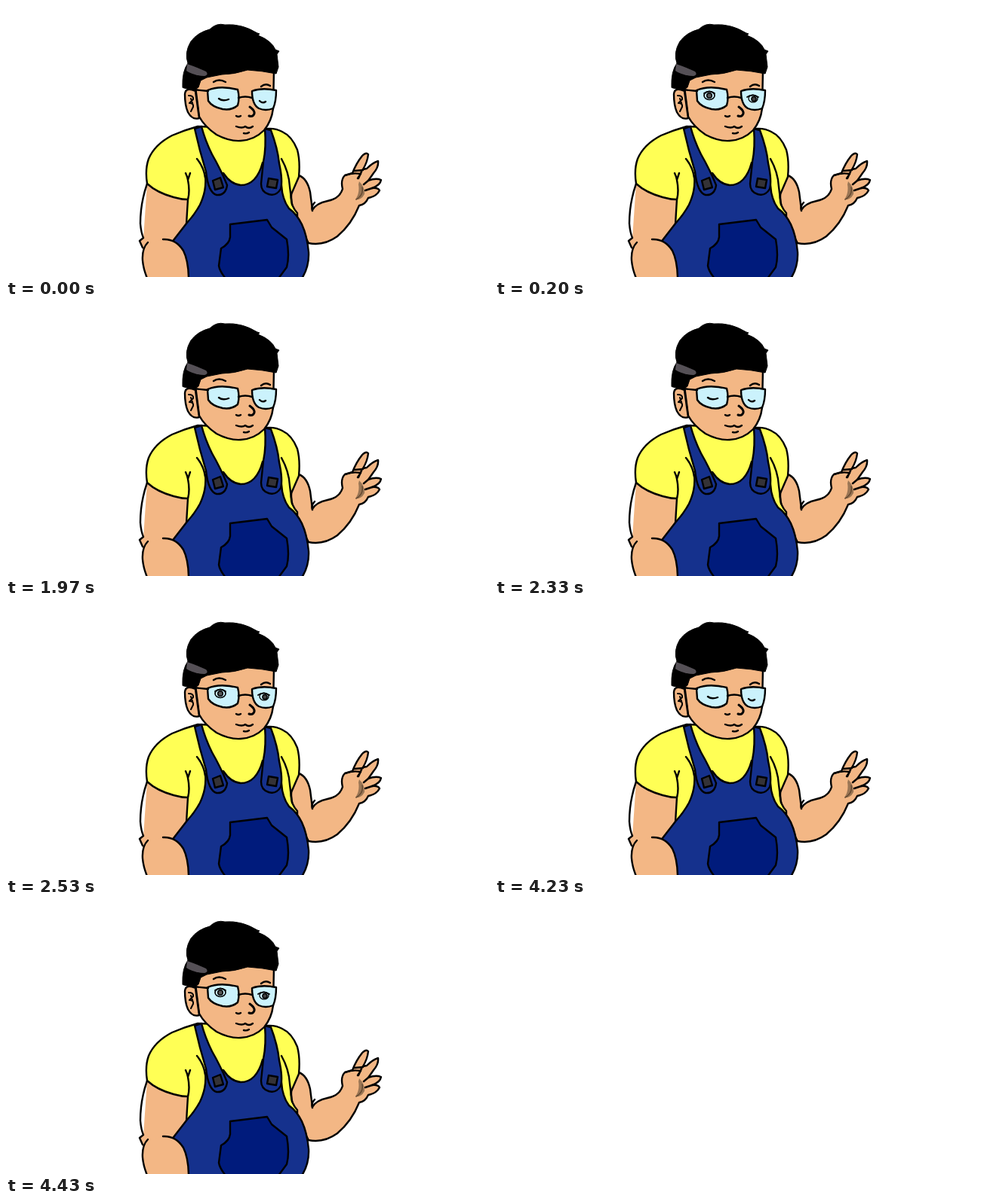
Animation of 640 by 360 pixels, one loop 5030 ms. Source, as an HTML page:

```html
<!DOCTYPE html>
<html lang="en">
<head>
<meta charset="utf-8">
<title>Blink</title>
<style>
  html, body { margin: 0; width: 100%; height: 100%; overflow: hidden; background: #fff; }
  svg { display: block; width: 100vw; height: 100vh; }
  .ink { stroke: #000; stroke-width: 2.4; stroke-linecap: round; stroke-linejoin: round; fill: none; }
  .skin { fill: #f3b785; }
  .shirt { fill: #ffff55; }
  .denim { fill: #15318d; }
  .lens { fill: #cbf2fc; }
  .button { fill: #343236; }
  .bare { stroke: none; }
</style>
</head>
<body>
<svg viewBox="0 0 640 360">
  <g class="ink">
    <!-- raised arm and hand -->
    <path class="skin" d="M388 225Q399 229 403 247L406 271Q411 262 426 259Q442 256 446 243Q443 231 449 225L459 222Q464 209 472 199Q477 194 480 197Q479 207 473 217L478 216Q486 208 493 206Q494 214 487 222L480 232Q490 228 497 231Q496 238 485 242Q493 241 495 245Q491 253 480 255Q476 264 468 265Q458 290 439 306Q421 319 401 315L378 272V240Z"/>
    <path d="M409 261Q404 266 406 272M449 225Q459 221 470 223L466 229M461 219L473 218M472 218L467 229M480 232L474 237M485 242L476 245"/>
    <path class="bare" d="M468 233Q476 241 475 250Q471 258 463 257Q469 248 467 237Z" fill="#9a7655"/>
    <path d="M472 241Q474 251 464 257" stroke="#654a32" stroke-width="1.5"/>

    <!-- hanging arm -->
    <path class="skin bare" d="M187 236L182 309L177 312L181 321Q180 345 187 364H242L240 257Z"/>
    <path d="M187 236Q178 262 178 289Q179 301 182 308L177 312L181 321"/>

    <!-- shirt -->
    <path class="shirt" d="M254 160Q236 165 220 172Q197 184 189 203Q184 217 187 236Q200 248 222 254Q232 257 241 257L239 290L265 310H386V275Q376 264 378 250L388 227Q390 206 386 191Q379 173 366 167Q357 162 346 163Z"/>
    <path d="M238 222Q240 226 241 231L244 222M241 231Q244 246 241 257M365 203Q375 221 376 240L379 264"/>

    <!-- overalls -->
    <path class="denim" d="M264 226Q266 245 257 264Q250 277 239 289L222 311V365H390Q402 348 401 327Q399 305 392 290Q385 276 375 269Q366 257 365 238L340 208Q332 238 311 238Q298 237 288 222Z"/>
    <path d="M253 203Q262 214 264 228"/>
    <path class="denim" d="M250 163L259 160Q264 179 273 197Q285 218 293 238Q291 252 279 251Q268 248 265 220L257 192Z"/>
    <path class="denim" d="M343 163L351 165Q360 189 362 209Q367 232 364 243Q358 253 348 250Q338 247 338 236L341 207Q345 188 343 163Z"/>
    <path class="button" d="M274 232L284 228L288 241L277 244Z"/>
    <path class="button" d="M348 229L360 231L358 242L346 240Z"/>
    <path d="M297 290L346 284L352 294L372 310Q376 332 372 347L361 362H291Q283 352 282 345L285 322Q296 316 297 307Z" fill="#001b7c"/>

    <!-- forearm -->
    <path class="skin bare" d="M187 315Q180 323 181 338Q182 350 187 364H242Q242 337 235 325Q225 310 208 310Z"/>
    <path d="M188 314Q180 322 181 338Q182 350 188 364M208 310Q225 309 235 325Q242 339 242 364"/>

    <!-- head -->
    <path class="skin" d="M250 100L256 147Q263 160 279 171Q296 180 311 179Q329 178 342 165Q352 153 354 136L355 85L290 82Z"/>
    <path class="skin" d="M251 113Q238 107 237 117Q237 132 241 141Q247 152 256 149Z"/>
    <path d="M242 119Q249 119 248 124L243 129Q249 129 248 134L245 140M245 123L248 132" stroke-width="2"/>
    <path d="M234 108Q233 87 241 76Q236 62 245 47Q254 35 270 31Q279 22 290 25Q312 23 333 36L336 37L334 39Q352 46 357 58L362 60L359 64L361 81L358 90Q339 86 320 85Q302 91 286 91L266 95L258 99L255 108L249 112L236 109Z" fill="#000" stroke-width="1"/>
    <path class="bare" d="M240 77Q252 81 265 87Q269 91 263 93Q247 92 239 86Z" fill="#555056"/>

    <!-- face -->
    <path d="M275 101Q282 96 291 101M338 107Q344 102 350 106M305 146Q308 148 311 146M305 160Q313 163 317 160Q322 164 327 160M315 169Q319 170 322 168"/>
    <path d="M323 134Q330 139 329 143Q327 148 322 146" stroke-width="3"/>
    <path class="lens" d="M267 112Q283 105 307 111Q310 122 307 132Q299 139 287 137Q273 134 268 126Z"/>
    <path class="lens" d="M326 113Q339 108 358 112Q358 127 354 136Q344 140 335 136Q326 131 326 113Z"/>
    <path d="M248 111L268 113M308 122Q317 119 326 122"/>

    <g id="open">
      <ellipse cx="284" cy="119" rx="7" ry="5.5" stroke-width="1.6"/>
      <circle cx="284" cy="119" r="3.3" fill="#555" stroke-width="1.5"/>
      <path d="M277 116Q284 111 291 116M334 121Q341 116 349 121" stroke-width="1.8"/>
      <ellipse cx="342" cy="123" rx="6" ry="4.8" stroke-width="1.3"/>
      <circle cx="343" cy="123.5" r="3" fill="#444" stroke-width="1.6"/>
    </g>
    <path id="closed" d="M282 123Q287 127 295 124M336 126Q340 130 344 127"/>
  </g>
</svg>
<script>
  const LOOP = 5030, BLINK = 200;
  const blinks = [0, 1970, 2330, 4230];
  const open = document.getElementById('open');
  const closed = document.getElementById('closed');
  const show = (el, on) => el.setAttribute('visibility', on ? 'visible' : 'hidden');
  const start = performance.now();

  function draw(now) {
    const t = Math.max(0, now - start) % LOOP;
    const shut = blinks.some(b => t >= b && t < b + BLINK);
    show(open, !shut);
    show(closed, shut);
    requestAnimationFrame(draw);
  }
  draw(start);
</script>
</body>
</html>
```
